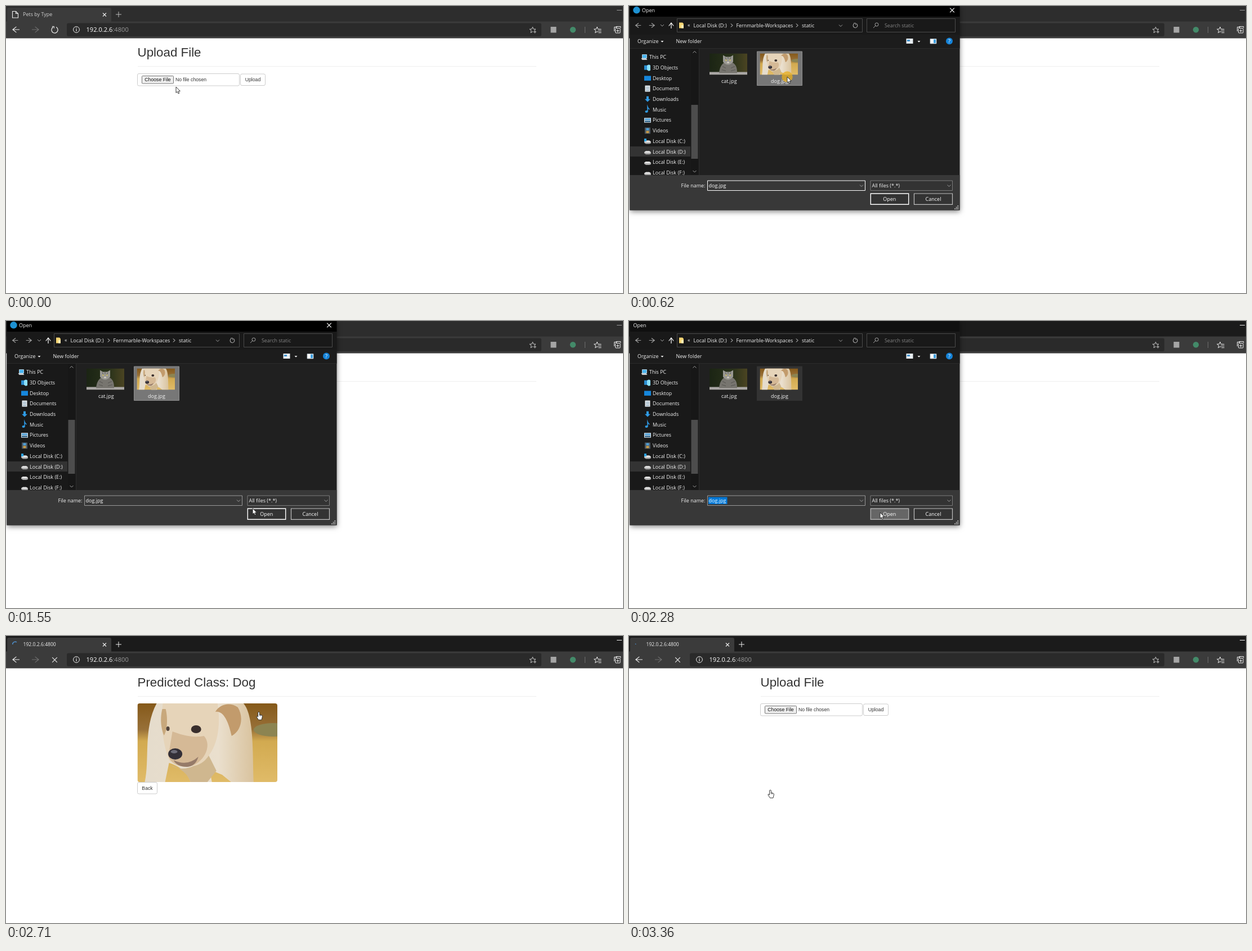
Recreate the animation shown at these times as an HTML page with a canvas. Size 1096 by 511 pixels, loop 3440 ms.

```html
<!DOCTYPE html>
<html lang="en">
<head>
<meta charset="utf-8">
<title>Upload demo</title>
<style>
html, body { margin: 0; width: 100%; height: 100%; overflow: hidden; background: #fff; }
canvas { display: block; width: 100vw; height: 100vh; }
</style>
</head>
<body>
<canvas id="stage" width="1096" height="511"></canvas>
<script>
const c = document.getElementById('stage').getContext('2d');
const LOOP = 3440, TAU = Math.PI * 2;
const UI = '"Open Sans", "Noto Sans", sans-serif';
const WEB = '"Liberation Sans", Arial, sans-serif';
const HOST = '192.0.2.6', PORT = ':4800', TITLE = 'Pets by Type';
const OPEN = 620, BLUR = 2280, CLOSED = 2400, RESULT = 2640, LOADED = 2870, RELOAD = 3290, HOME = 3360;

// start, end, steps, from x, y, to x, y, ease-out power (0 = smooth)
const MOVES = [
  [70, 390, 5, 302, 144, 277, 126, 0],
  [OPEN, OPEN, 1, 281, 126, 281, 126, 0],
  [850, 1310, 7, 281, 126, 398, 296, 0],
  [1390, 1780, 6, 398, 296, 446, 341, 2.6],
  [2470, 2470, 1, 449, 135, 449, 135, 0],
  [2790, 3130, 5, 449, 135, 251, 274, 0]
];

function pointer(t) {
  let p = [302, 144];
  for (const [a, b, n, x0, y0, x1, y1, pow] of MOVES) {
    if (t < a) break;
    const k = n === 1 ? 1 : Math.min(n, Math.floor((t - a) / (b - a) * (n - 1) + 1e-6) + 1);
    const u = k / n, e = pow ? 1 - (1 - u) ** pow : u * u * (3 - 2 * u);
    p = [x0 + (x1 - x0) * e, y0 + (y1 - y0) * e];
  }
  return p;
}

function rect(x, y, w, h, fill) {
  c.fillStyle = fill;
  c.fillRect(x, y, w, h);
}
function box(x, y, w, h, fill, stroke, r = 0, lw = 1) {
  c.beginPath();
  c.roundRect(x, y, w, h, r);
  paint(fill, stroke, lw);
}
function paint(fill, stroke, lw = 1) {
  if (fill) { c.fillStyle = fill; c.fill(); }
  if (stroke) { c.strokeStyle = stroke; c.lineWidth = lw; c.stroke(); }
}
function oval(x, y, rx, ry, fill, stroke, lw) {
  c.beginPath();
  c.ellipse(x, y, rx, ry, 0, 0, TAU);
  paint(fill, stroke, lw);
}
function shape(d, x, y, fill, stroke, lw = 1) {
  c.save();
  c.translate(x, y);
  const p = new Path2D(d);
  if (fill) { c.fillStyle = fill; c.fill(p); }
  if (stroke) { c.strokeStyle = stroke; c.lineWidth = lw; c.stroke(p); }
  c.restore();
}
function text(s, x, mid, size, color, font = UI, align = 'left') {
  c.font = size + 'px ' + font;
  c.textAlign = align;
  c.fillStyle = color;
  c.fillText(s, x, mid + size * 0.36);
  return c.measureText(s).width;
}
function cross(x, y, r, color) {
  shape(`M${-r} ${-r}L${r} ${r}M${r} ${-r}L${-r} ${r}`, x, y, null, color, 1.1);
}
function arrow(x, y, r, turn, color) {
  c.save();
  c.translate(x, y);
  c.rotate(turn);
  shape(`M${r} 0H${-r}M${1 - r * 0.1} ${-r * 0.85}L${-r} 0L${1 - r * 0.1} ${r * 0.85}`, 0, 0, null, color, 1.2);
  c.restore();
}
function chevron(x, y, turn, color) {
  c.save();
  c.translate(x, y);
  c.rotate(turn);
  shape('M-3 -1.5L0 1.5L3 -1.5', 0, 0, null, color, 1);
  c.restore();
}
function reload(x, y, r, color) {
  c.beginPath();
  c.arc(x, y, r, -1.1, 4.2);
  paint(null, color, 1.2);
  shape('M-4 -4.5H-0.5V-1.2', x - r + 5, y - r + 4, null, color);
}
function star(x, y, color) {
  c.beginPath();
  for (let i = 0; i < 10; i++) {
    const r = i % 2 ? 2.5 : 5.8, a = i * TAU / 10 - TAU / 4;
    c.lineTo(x + r * Math.cos(a), y + r * Math.sin(a));
  }
  c.closePath();
  paint(null, color, 1);
}

function puppy(x, y, w, h, r) {
  c.save();
  c.beginPath();
  c.roundRect(x, y, w, h, r);
  c.clip();
  c.translate(x, y);
  c.scale(w / 248, h / 140);
  const g = c.createLinearGradient(0, 0, 0, 140);
  g.addColorStop(0, '#85591a');
  g.addColorStop(0.33, '#987038');
  g.addColorStop(0.48, '#d2aa50');
  g.addColorStop(1, '#e0bb68');
  rect(0, 0, 248, 140, g);
  oval(240, 47, 34, 12, '#8c8451');
  const coat = c.createLinearGradient(20, 0, 210, 0);
  coat.addColorStop(0, '#e5dccc');
  coat.addColorStop(0.65, '#eadfcd');
  coat.addColorStop(1, '#d8c19b');
  shape('M34 0H188C207 22 204 90 206 140H166L150 127L128 118L132 140H94C88 120 70 110 56 106L49 140H13C22 100 10 45 34 0Z', 0, 0, coat);
  shape('M58 110Q90 128 126 92L140 120L124 140H94C88 122 72 114 58 110Z', 0, 0, '#cfb78f');
  shape('M45 0H142C148 40 143 76 120 101C104 117 70 116 57 102C48 82 40 45 45 0Z', 0, 0, '#e6d4b9');
  shape('M62 50C76 55 94 62 118 58C134 76 116 108 92 112C74 115 57 105 55 93Z', 0, 0, '#d5b996');
  shape('M138 15C155 12 163 40 167 58C184 49 189 25 178 7C164 -3 146 1 138 15Z', 0, 0, '#c29b6c');
  shape('M44 10C39 30 43 48 47 57C53 48 54 25 50 10Z', 0, 0, '#c8a87c');
  shape('M64 101Q88 113 108 95Q103 112 88 113Q70 113 64 101Z', 0, 0, '#967b69');
  oval(104, 46, 9, 7, '#392e2c');
  oval(54, 45, 3, 4, '#51433b');
  oval(67, 90, 12.5, 10, '#343038');
  oval(65, 86, 6, 3, '#6d6c78');
  c.restore();
}

function kitten(x, y) {
  c.save();
  c.beginPath();
  c.rect(x, y, 67, 38);
  c.clip();
  c.translate(x, y);
  const g = c.createLinearGradient(0, 0, 67, 0);
  g.addColorStop(0, '#1b2414');
  g.addColorStop(0.6, '#29321a');
  g.addColorStop(1, '#4b4422');
  rect(0, 0, 67, 38, g);
  rect(0, 33, 67, 5, '#aaa7a5');
  shape('M17 35C18 20 27 13 34 14C47 16 49 25 49 35Z', 0, 0, '#77756f');
  shape('M24 3L29 6H37L42 3L42 15Q33 25 24 15Z', 0, 0, '#9a9993');
  shape('M28 7L30 11M33 6V10M38 7L36 11M23 23L29 26M45 23L38 26M22 29L29 31M46 29L38 31', 0, 0, null, '#55544f', 1);
  oval(29.5, 12, 1.5, 1, '#d2c15a');
  oval(36.5, 12, 1.5, 1, '#d2c15a');
  oval(33, 16, 2, 1.5, '#d0cac2');
  c.restore();
}

function browser(t) {
  const active = (t >= 390 && t < OPEN) || t >= BLUR;
  const busy = (t >= RESULT && t < LOADED) || t >= RELOAD;
  const W = '#eee';
  rect(0, 0, 1096, 28, active ? '#1b1b1b' : '#2d2d2d');
  rect(0, 27.5, 1096, 30, '#3b3b3b');
  box(2, 3, 185, 30, '#3b3b3b', null, 3);
  if (busy) {
    const len = t < 2710 ? 1 : t < RELOAD ? 2.1 : t < HOME ? 0.8 : 0.25;
    c.beginPath();
    c.arc(16.5, 15, 4.8, Math.PI, Math.PI + len);
    paint(null, '#4f94d4', 1.6);
    text(HOST + PORT, 30.5, 15, 8.6, W);
  } else {
    shape('M0.5 0.5H6.5L10.5 4.5V12H0.5ZM6.5 0.5V4.5H10.5', 11, 9, null, W, 1.1);
    text(TITLE, 30, 15, 9, active ? W : '#d0d0d0');
  }
  cross(175, 15.5, 3, W);
  shape('M-5 0H5M0 -5V5', 200, 15, null, active ? W : '#bbb', 1);
  rect(1085, 7, 9, 1, active ? W : '#999');

  arrow(18, 42, 6, 0, W);
  arrow(52, 42, 6, Math.PI, '#707070');
  if (busy) cross(86.5, 42.5, 4.3, W);
  else reload(86.5, 42.5, 5.6, W);
  box(108, 30.5, 843, 23.5, '#2a2a2a', null, 3);
  oval(125, 42, 5.4, 5.4, null, W, 1);
  rect(124.4, 41, 1.2, 4, W);
  rect(124.4, 38.7, 1.2, 1.3, W);
  const w = text(HOST, 142.5, 42.3, 11.1, '#fff');
  text(PORT, 142.5 + w, 42.3, 11.1, '#999');
  star(935.5, 43, '#c4c4c4');
  rect(936.5, 43.5, 6, 5, '#2a2a2a');
  shape('M-2.5 0H2.5M0 -2.5V2.5', 939.5, 46, null, '#c4c4c4', 1);
  rect(967.5, 37, 10, 10.5, '#a5a5a5');
  oval(1007, 42.3, 5.2, 5.2, '#438a69');
  rect(1028, 37, 1, 11, '#6c6c6c');
  star(1050, 43, W);
  rect(1051.5, 40.5, 7, 7.5, '#3b3b3b');
  shape('M0 0H6M0 3H6M1 6H6', 1051.5, 41.5, null, W, 1);
  box(1082.5, 39.5, 8.5, 8.5, null, W, 1);
  shape('M-2.7 -3V-5.5H5V-3M-2.5 2H2.5M0 -0.5V4.5', 1086.7, 42, null, W, 1);
  shape('M-6 2.5V-5H-1', 1086.5, 42.5, null, W, 1);
}

const inside = ([x, y], l, t, r, b) => x > l && x < r && y > t && y < b;

function button(s, x, y, w, h, hover) {
  box(x, y, w, h, hover ? '#e6e6e6' : '#fff', hover ? '#adadad' : '#ccc', 2.5);
  text(s, x + w / 2, y + h / 2 + 0.1, 8.7, '#333', WEB, 'center');
}

function page(t, p) {
  const result = t >= RESULT && t < HOME;
  const live = t < OPEN || t >= CLOSED;
  text(result ? 'Predicted Class: Dog' : 'Upload File', 233.5, 82.2, 22.35, '#333', WEB);
  rect(234, 107, 708, 1, '#eee');
  if (result) {
    puppy(233.5, 120, 248.5, 140, 4);
    button('Back', 233.5, 260.5, 35, 20.5, inside(p, 233, 260, 269, 281));
    return;
  }
  const hover = live && inside(p, 233, 120, 415, 143);
  box(233.5, 120.5, 181, 21.5, hover ? '#e6e6e6' : '#fff', hover ? '#adadad' : '#ccc', 2.5);
  box(241.5, 124.5, 56, 13.5, hover ? '#e5e5e5' : '#efefef', hover ? '#4f4f4f' : '#767676', 1);
  text('Choose File', 269.5, 131.3, 8.7, '#111', WEB, 'center');
  text(t >= CLOSED && t < RESULT ? 'dog.jpg' : 'No file chosen', 301, 131.3, 8.7, '#333', WEB);
  button('Upload', 416.5, 121, 44, 20.5, live && inside(p, 416, 120, 461, 142));
}

const PLACES = ['This PC', '3D Objects', 'Desktop', 'Documents', 'Downloads', 'Music', 'Pictures', 'Videos',
  'Local Disk (C:)', 'Local Disk (D:)', 'Local Disk (E:)', 'Local Disk (F:)'];

function placeIcon(i, y) {
  const B = '#2f9be6';
  if (i === 0) {
    box(23.5, y - 4.5, 8, 6.5, '#48b4f0', '#d6e6ee', 0, 0.8);
    shape('M0 0H9L11 3H2Z', 21.5, y + 2, '#c9ced2');
  } else if (i === 1) {
    rect(27, y - 4, 11, 8, '#2b8fd2');
    shape('M0 -4L3.5 -5.5L6 -4V5L3 6L0 4Z', 32, y, '#8ee0fa');
  } else if (i === 2) rect(27, y - 4, 12, 8.5, '#1687dc');
  else if (i === 3) {
    rect(28.5, y - 5.5, 9, 11, '#e8edf0');
    for (let k = 0; k < 3; k++) rect(30, y - 3 + k * 3, 6, 1, '#688ca8');
  } else if (i === 4) shape('M-2 -5H2V0H5L0 5L-5 0H-2Z', 33, y, B);
  else if (i === 5) {
    oval(31, y + 3.5, 2.5, 2, B);
    shape('M0 4V-5Q1 -2 3.5 -0.5', 33, y, null, B, 1.5);
  } else if (i === 6) {
    rect(27, y - 4, 12, 8.5, '#e4edf2');
    rect(28, y - 3, 10, 3, '#4fa0d8');
    rect(28, y + 1, 10, 2.5, '#2d6186');
  } else if (i === 7) {
    rect(28, y - 5.5, 10, 11, '#4d5964');
    rect(30.5, y - 4.5, 5, 4, '#4fa0d8');
    rect(30.5, y + 0.5, 5, 4, '#c99c48');
  } else {
    shape('M0 1L3 -1H9L12 1V4L9 5H3L0 3Z', 27, y, '#aaa');
    shape('M0 1L3 -1H9L12 1L9 2.3H3Z', 27, y, '#e2e2e2');
    if (i === 8) rect(27, y - 4.5, 4, 5, '#2ea7ea');
  }
}

function dialog(t, p) {
  const front = t < BLUR, picked = t < 1940;
  const T = '#f2f2f2', G = '#a0a0a0';
  c.save();
  c.shadowColor = 'rgba(0,0,0,.5)';
  c.shadowBlur = 9;
  c.shadowOffsetY = 2;
  rect(1.5, 0, 586, 363.5, '#202020');
  c.restore();
  rect(1.5, 0, 586, 19, front ? '#000' : '#101010');
  if (front) {
    oval(13.5, 7.3, 6.2, 6.2, '#1d91d2');
    cross(574, 7.5, 3.8, '#fff');
  }
  text('Open', front ? 23 : 7.5, 8, 9, T);

  rect(1.5, 19, 586, 32.5, '#191919');
  arrow(16.5, 34.5, 4.8, 0, G);
  arrow(40.5, 34.5, 4.8, Math.PI, G);
  chevron(59, 34.5, 0, G);
  arrow(75, 35, 5, Math.PI / 2, '#fff');
  box(85.5, 22.5, 329, 24, '#191919', '#4b4b4b');
  box(422.5, 22.5, 157, 24, '#191919', '#4b4b4b');
  shape('M0 0H6L8 2V10H0Z', 89, 29.5, '#f5d574');
  rect(93, 34, 4, 5.5, '#fff0b8');
  text('«', 104, 34, 9, T);
  text('Local Disk (D:)', 114.5, 34.6, 9.1, T);
  chevron(182.5, 34.5, -TAU / 4, T);
  text('Fernmarble-Workspaces', 190.5, 34.6, 8.9, T);
  chevron(298.5, 34.5, -TAU / 4, T);
  text('static', 307, 34.6, 9, T);
  chevron(376, 35, 0, G);
  reload(402, 34.8, 3.8, G);
  oval(440, 33, 3, 3, null, G, 1);
  shape('M0 0L-4 4', 438, 35, null, G, 1);
  text('Search static', 454, 34.6, 8.9, '#858585');

  rect(1.5, 51.5, 586, 23.5, '#1c1c1c');
  rect(1.5, 75, 586, 1, '#2b2b2b');
  text('Organize', 15, 63, 9, T);
  shape('M-2.5 -1H2.5L0 1.7Z', 59, 63, T);
  text('New folder', 83.5, 63, 9, T);
  rect(492.5, 58, 12, 9, '#e7edf2');
  rect(494, 60, 5, 3, '#4093d0');
  shape('M-2.5 -1H2.5L0 1.7Z', 515, 63, T);
  box(535, 58.5, 11, 8.5, '#fff', '#a5b5c0', 0, 0.8);
  rect(541, 59.5, 4, 6.5, '#3e9fe0');
  oval(569, 62.5, 6, 6, '#1583d8');
  text('?', 569, 62.6, 9.5, '#fff', UI, 'center');

  rect(1.5, 76, 122.5, 225, '#191919');
  rect(1.5, 250, 107.5, 18, '#333');
  PLACES.forEach((s, i) => {
    const y = 91 + i * 18.7;
    placeIcon(i, y);
    text(s, i ? 42 : 36, y, i > 7 ? 9.05 : 8.9, T);
  });
  rect(110, 76, 13, 225, '#171717');
  rect(110.5, 176, 12, 96, '#4d4d4d');
  chevron(116.5, 82, Math.PI, G);
  chevron(116.5, 294.5, 0, G);
  rect(124, 76, 1, 225, '#2d2d2d');

  kitten(143, 84.5);
  text('cat.jpg', 177.8, 134, 9, T, UI, 'center');
  if (picked) box(227.5, 81, 80, 60.5, '#777', '#8d8d8d');
  else rect(227, 80.5, 81, 61.5, '#333');
  puppy(232.5, 84.5, 67.5, 38, 0);
  text('dog.jpg', 267.5, 134, 9, T, UI, 'center');

  rect(1.5, 301, 586, 62.5, '#383838');
  text('File name:', 135.5, 320, 9, T, UI, 'right');
  box(139.5, 311, 280, 17.5, '#383838', t < 850 ? '#fff' : '#999');
  if (!picked) rect(141, 313.5, 33.5, 12.5, '#0078d7');
  text('dog.jpg', 141.5, 320, 9, '#fff');
  chevron(413, 320, 0, G);
  box(429, 311, 145.5, 17.5, '#333', '#7c7c7c');
  text('All files (*.*)', 431.5, 320, 9, T);
  chevron(568.5, 320, 0, G);
  const hot = p[1] > 335 && p[0] > 429;
  box(429.3, 334, 67.4, 19.3, hot ? '#666' : '#333', hot ? '#b0b0b0' : '#fff', 0, 1.4);
  text('Open', 462.7, 343.7, 9, '#fff', UI, 'center');
  box(506.5, 334, 68, 19.3, '#333', '#c0c0c0', 0, 1.2);
  text('Cancel', 540.5, 343.7, 9, '#fff', UI, 'center');
  for (let i = 0; i < 3; i++)
    for (let j = 0; j <= i; j++) rect(583.5 - j * 2.7, 355 + i * 2.7, 1.7, 1.7, '#c8c8c8');
}

function cursor(t, p) {
  const [x, y] = p;
  if ((t >= OPEN && t < 850) || (t >= 1940 && t < 2170)) oval(x, y, 9.7, 9.7, 'rgba(232,174,28,.75)');
  const hand = (t >= 2470 && t < 2790) || t >= 3130;
  if (hand) {
    shape('M-1.4 1Q0 -.9 1.4 1V5L5.3 6Q6.7 6.5 6.3 9L5 14.3H-.5L-3.8 9.2Q-4.4 7.2 -2.8 7.8L-1.4 9Z', x, y, '#fff', '#222', 0.9);
    shape('M1.4 5V7.5M3.4 5.6V8', x, y, null, '#222', 0.7);
  } else shape('M0 0V10.5L2.4 8.4L4 12L5.8 11.2L4.2 7.8L7.3 7.5Z', x, y, '#fff', '#222', 0.9);
  if (t >= 550 && t < OPEN) {
    oval(x + 8, y + 1, 3.8, 3.8, '#cfeaff', '#1c86d8', 2.6);
    c.beginPath();
    c.arc(x + 8, y + 1, 3.8, 3.4, 4.6);
    paint(null, '#6fc0f5', 1.8);
  }
}

function draw(now) {
  const t = now % LOOP, p = pointer(t);
  rect(0, 0, 1096, 511, '#fff');
  page(t, p);
  browser(t);
  if (t >= OPEN && t < CLOSED) dialog(t, p);
  cursor(t, p);
  requestAnimationFrame(draw);
}
requestAnimationFrame(draw);
</script>
</body>
</html>
```
